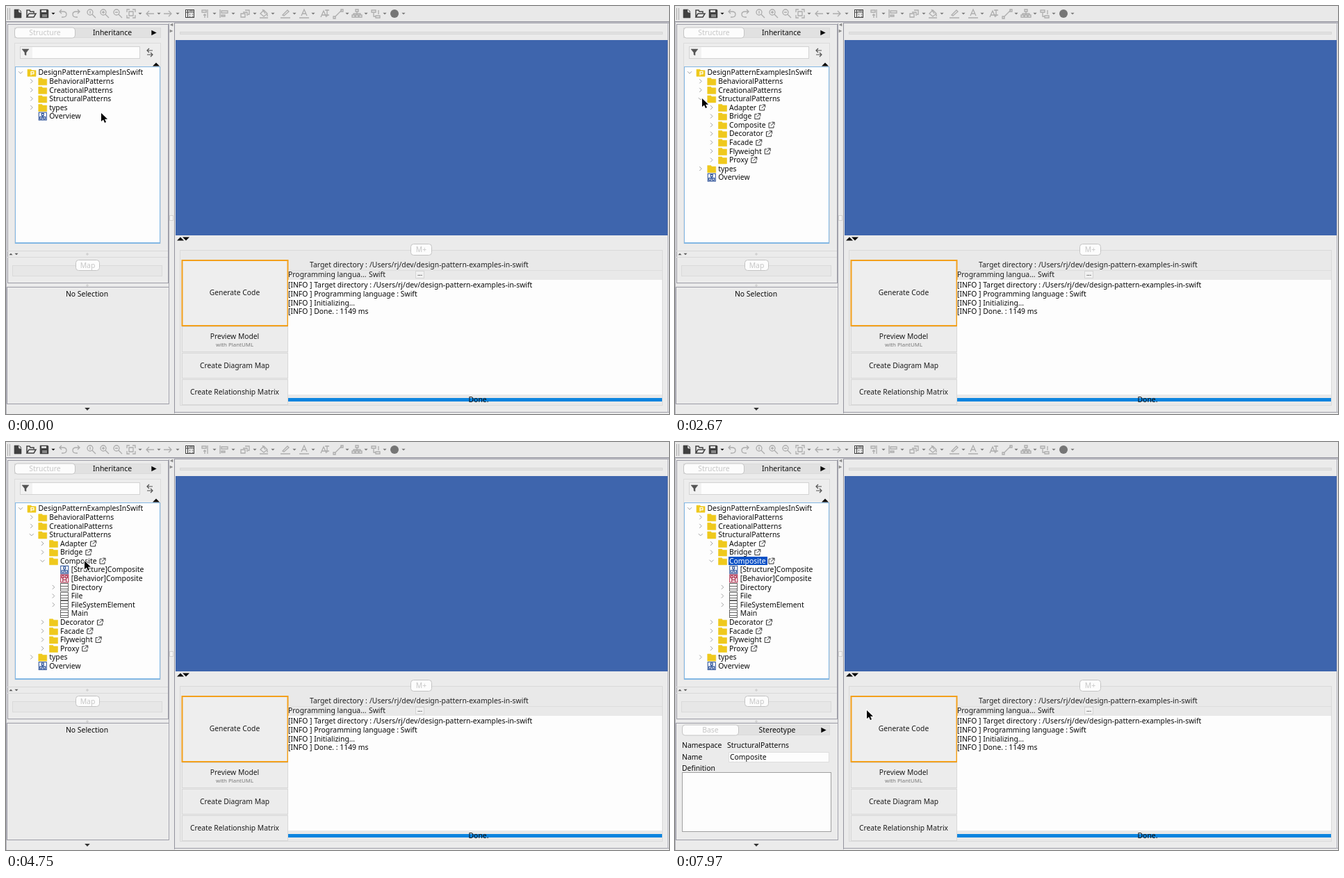
Write an HTML page with a canvas that moves like this. It is 954 px wide and 587 px high and loops after 7990 ms.

```html
<!DOCTYPE html>
<html lang="en">
<head>
<meta charset="utf-8">
<style>
html, body { margin: 0; width: 954px; height: 587px; overflow: hidden; background: #ebebeb; }
canvas { display: block; }
</style>
</head>
<body>
<canvas id="stage" width="954" height="587"></canvas>
<script>
const LOOP = 7990, OPEN_STRUCTURAL = 2200, OPEN_COMPOSITE = 3900, SELECT = 5150;
const ctx = document.getElementById('stage').getContext('2d');
const GREY = '#ebebeb', DIM = '#adadad', DARK = '#404040', INK = '#0a0a0a', PAPER = '#fdfdfd';

// time, x, y of the pointer tip; eased between points
const path = [
  [0, 137, 154], [1000, 137, 154], [1360, 71, 138], [1700, 39, 133], [2700, 39, 133],
  [3530, 54, 169], [4150, 54, 169], [4700, 113, 171], [6230, 113, 171],
  [6930, 183, 283], [7970, 276, 386], [7990, 276, 386]
];

function rect(x, y, w, h, fill, stroke) {
  if (fill) { ctx.fillStyle = fill; ctx.fillRect(x, y, w, h); }
  if (stroke) { ctx.strokeStyle = stroke; ctx.lineWidth = 1; ctx.strokeRect(x + .5, y + .5, w - 1, h - 1); }
}

function text(s, x, y, { size = 10.4, color = INK, align = 'left', weight = 500 } = {}) {
  ctx.font = `${weight} ${size}px "Noto Sans", "Open Sans", sans-serif`;
  ctx.textAlign = align;
  ctx.fillStyle = color;
  ctx.fillText(s, x, y + 3.7);
}

function icon(d, x, y, color = DIM, width = 1.3, fill = false) {
  ctx.save();
  ctx.translate(x, y);
  const p = new Path2D(d);
  ctx.strokeStyle = ctx.fillStyle = color;
  ctx.lineWidth = width;
  if (fill) ctx.fill(p);
  if (width) ctx.stroke(p);
  ctx.restore();
}

function triangle(x, y, r, dir, color = INK) {
  const shapes = {
    up: `M${-r} ${r / 2}H${r}L0 ${-r / 2}Z`,
    down: `M${-r} ${-r / 2}H${r}L0 ${r / 2}Z`,
    right: `M${-r} ${-r}L${r} 0L${-r} ${r}Z`,
    left: `M${r} ${-r}L${-r} 0L${r} ${r}Z`
  };
  icon(shapes[dir], x, y, color, 0, true);
}

function pill(label, x, y, w, h) {
  ctx.beginPath();
  ctx.roundRect(x + .5, y + .5, w - 1, h - 1, 4);
  ctx.fillStyle = '#fcfcfc';
  ctx.fill();
  ctx.strokeStyle = '#c4c4c4';
  ctx.lineWidth = 1;
  ctx.stroke();
  text(label, x + w / 2, y + h / 2, { align: 'center', color: '#c6c6c6' });
}

function tabs(active, other, y, w) {
  rect(12, y, 211, 15, '#e1e1e1', '#dadada');
  text(other, 12 + w + 53, y + 7.5, { align: 'center' });
  triangle(y < 100 ? 213 : 214, y + 7.5, 3.7, 'right');
  pill(active, y < 100 ? 12 : 10, y - .5, w, 16);
}

const toolbar = [
  ['M-5 -3H0Q5 -3 5 1Q5 5 0 5H-2M-2 -6L-5 -3L-2 0', 82],
  ['M5 -3H0Q-5 -3 -5 1Q-5 5 0 5H2M2 -6L5 -3L2 0', 101],
  ['M-6 -2A4 4 0 1 1 2 -2A4 4 0 1 1 -6 -2M1 1L6 6M-2 -4V0', 123],
  ['M-6 -2A4 4 0 1 1 2 -2A4 4 0 1 1 -6 -2M1 1L6 6M-4 -2H0M-2 -4V0', 142],
  ['M-6 -2A4 4 0 1 1 2 -2A4 4 0 1 1 -6 -2M1 1L6 6M-4 -2H0', 161],
  ['M-6 -2V-6H-2M2 -6H6V-2M6 2V6H2M-2 6H-6V2M-3 -3H3V3H-3Z', 180, 193],
  ['M6 0H-5M-1 -4L-5 0L-1 4', 207, 220],
  ['M-6 0H5M1 -4L5 0L1 4', 233, 247],
  ['M-5 -5H1V-2H-5ZM3 -6V6M-1 0V6M-3 2H1', 287, 300],
  ['M-6 -6V6M-4 -4H5V-1H-4ZM-4 2H1V4H-4Z', 314, 327],
  ['M-6 0H0V5H-6ZM-3 -2H3V3M0 -5H6V1H4', 344, 358],
  ['M-5 0L0 -5L5 0L0 4ZM-2 -6L2 0M-6 6H6M5 1V4', 371, 384],
  ['M-4 2L3 -5L5 -3L-2 3ZM-7 6H7', 402, 415],
  ['M-4 3L0 -6L4 3M-2 0H2M-7 6H7', 429, 442],
  ['M-6 5L-2 -4L2 5M-5 2H1M0 -5H6M3 -6V4M0 2H6', 459],
  ['M-5 5L5 -5M-7 4H-4V7H-7ZM4 -6H7V-3H4Z', 478, 491],
  ['M-2 -6H2V-3H-2ZM0 -3V2M-5 2V0H5V2M-7 2H-3V5H-7ZM-2 2H2V5H-2ZM3 2H7V5H3Z', 505, 518],
  ['M-6 -5H0V-2H-6ZM0 3H6V6H0ZM-3 -1V4H0M4 -5V1', 532, 545]
];

function drawToolbar() {
  rect(0, 0, 954, 22, '#e9e9e9');
  rect(0, 22, 954, 1, '#8e8e98');
  rect(0, 23, 954, 1, '#c9c9cf');
  rect(2, 3, 1, 17, '#aaa');
  rect(5, 3, 1, 17, '#aaa');
  icon('M-5 -6H2L5 -3V6H-5ZM1 -6V-2H5', 17, 11, DARK, .6, true);
  icon('M2 -6V-2H6', 17, 11, GREY, .8);
  icon('M-6 5V-5H-2L-1 -3H4V-1M-6 5L-3 0H7L4 5Z', 36, 11, DARK, 1.5);
  icon('M-6 -6H5L6 -5V6H-6Z', 55, 11, DARK, .5, true);
  rect(51, 6, 7, 3, '#ddd');
  rect(52, 12, 7, 4, '#888');
  triangle(68, 11, 2.6, 'down');
  for (const [d, x, arrow] of toolbar) {
    icon(d, x, 11);
    if (arrow) triangle(arrow, 11, 2.6, 'down', '#777');
  }
  rect(258, 5, 13, 12, '#f5f5f5', DARK);
  icon('M-3 -6V6M-6 -2H6M-1 1H1M3 1H5M-1 4H1M3 4H5M-1 -4H5', 264.5, 11, DARK, 1.2);
  icon('M-6 0A6 6 0 1 1 6 0A6 6 0 1 1 -6 0', 559, 11, '#757575', 0, true);
  triangle(572, 11, 2.6, 'down', '#777');
}

function diagramIcon(x, y, color, behavior) {
  rect(x - 6, y - 6, 12, 12, '#fff', color);
  icon(behavior ? 'M-4 -4H-1V-1H-4ZM1 -4H4V-1H1ZM-2.5 -1V5M2.5 -1V5M-2.5 2H2.5'
    : 'M-1.5 -4H1.5V-1H-1.5ZM0 -1V1M-3 1H3M-4 1H-1V4H-4ZM1 1H4V4H1Z', x, y, color, 1.1);
}

function treeRows(t) {
  const rows = [[0, 'DesignPatternExamplesInSwift', 'root', true],
    [1, 'BehavioralPatterns'], [1, 'CreationalPatterns'],
    [1, 'StructuralPatterns', 'folder', t >= OPEN_STRUCTURAL]];
  if (t >= OPEN_STRUCTURAL) {
    for (const name of ['Adapter', 'Bridge', 'Composite', 'Decorator', 'Facade', 'Flyweight', 'Proxy']) {
      const open = name === 'Composite' && t >= OPEN_COMPOSITE;
      rows.push([2, name, 'link', open]);
      if (open) rows.push([3, '[Structure]Composite', 'diagram'], [3, '[Behavior]Composite', 'behavior'],
        [3, 'Directory', 'class'], [3, 'File', 'class'], [3, 'FileSystemElement', 'class'], [3, 'Main', 'leaf']);
    }
  }
  rows.push([1, 'types'], [1, 'Overview', 'diagram']);
  return rows;
}

function drawTree(t) {
  rect(13, 87, 209, 255, PAPER, '#82b7e4');
  rect(14, 340, 207, 1, '#82b7e4');
  treeRows(t).forEach(([depth, name, kind = 'folder', open], i) => {
    const x = 37 + depth * 15.75, y = 95.7 + i * 12.58;
    if (!['diagram', 'behavior', 'leaf'].includes(kind))
      icon(open ? 'M-3 -1.5L0 1.5L3 -1.5' : 'M-1.5 -3L1.5 0L-1.5 3', x - 16, y, '#a2a2a2', 1);
    if (kind === 'diagram') diagramIcon(x, y, '#234a94');
    else if (kind === 'behavior') diagramIcon(x, y, '#a51c3d', true);
    else if (kind === 'class' || kind === 'leaf') {
      const top = Math.round(y) - 6;
      rect(Math.round(x) - 6, top, 12, 12, '#fff', '#666');
      rect(Math.round(x) - 6, top + 4, 12, 1, '#666');
      rect(Math.round(x) - 6, top + 8, 12, 1, '#666');
    } else {
      icon('M-6 -4.5H-1L0 -3H6V5.5H-6Z', x, y, '#efc91d', .6, true);
      if (kind === 'root') icon('M-1 4V-1H3V2H-1', x, y, '#fff', 1.2);
    }
    const picked = name === 'Composite' && t >= SELECT;
    if (picked) rect(77, Math.round(y) - 6, 56, 12, '#0c51c5');
    text(name, x + 9.5, y, { color: picked ? '#fff' : INK });
    if (kind === 'link')
      icon('M-1 -3H-4V4H3V1M0 -4H4V0M4 -4L-1 1', x + 18 + ctx.measureText(name).width, y, '#333', 1);
  });
}

function drawLeft(t) {
  rect(2, 26, 232, 373, null, '#9c9ca6');
  rect(0, 24, 1, 563, '#b4b4bd');
  tabs('Structure', 'Inheritance', 31, 88);
  rect(12, 53, 211, 289, '#ededed', '#dcdcdc');
  rect(20, 58, 173, 18, '#f2f2f2', '#d3d3d3');
  rect(38, 59, 154, 16, PAPER);
  icon('M-5 -4H5L1 1V5L-1 4V1Z', 28, 66, '#555', .5, true);
  icon('M4 -3H-4M-1 -6L-4 -3L-1 0M-4 3H4M1 0L4 3L1 6', 207, 67, '#555', 1.2);
  triangle(216, 84, 5, 'up');
  drawTree(t);

  rect(2, 352, 231, 1, '#d8d8d8');
  rect(2, 361, 231, 1, '#dadada');
  triangle(7, 357, 2.5, 'up', '#555');
  triangle(15, 357, 2.5, 'down', '#555');
  icon('M-2 0H2M0 -2V2', 117, 357, '#c9c9c9', 1);
  rect(9, 373, 216, 16, '#e7e7e7', '#dadada');
  pill('Map', 100, 365, 35, 16);
  icon('M-2 0H2M0 -2V2', 117, 402, '#c9c9c9', 1);

  rect(1, 404, 234, 169, null, '#9c9ca6');
  if (t < SELECT) text('No Selection', 116.5, 414, { align: 'center' });
  else {
    tabs('Base', 'Stereotype', 407, 82);
    text('Namespace', 10, 436);
    text('StructuralPatterns', 75, 436);
    text('Name', 10, 453);
    rect(77, 446, 145, 15, PAPER, '#dedede');
    text('Composite', 79, 453);
    text('Definition', 10, 469);
    rect(10, 475, 215, 86, PAPER, '#a0a0a0');
  }
  triangle(117, 580, 3.8, 'down', '#333');
}

function drawRight() {
  rect(234, 25, 1, 548, '#a5a5ae');
  rect(242, 24, 1, 562, '#92929c');
  rect(243, 24, 711, 1, '#9c9ca6');
  rect(242, 584, 712, 1, '#9c9ca6');
  rect(952, 24, 1, 561, '#b5b5bd');
  triangle(238, 27, 2.3, 'left', '#888');
  triangle(238, 36, 2.3, 'right', '#888');
  rect(235, 301, 6, 8, '#f4f4f4', '#d3d3d3');
  rect(250, 37, 695, 4, '#e2e2e2', '#d6d6d6');
  rect(244, 49, 708, 281, '#3e65ad');
  triangle(251, 335, 5, 'up');
  triangle(259, 335, 5, 'down');

  rect(250, 351, 695, 224, '#e9e9e9', '#dadada');
  pill('M+', 582, 342, 31, 17);
  rect(253, 365, 153, 95, '#eeeeee');
  ctx.strokeStyle = '#f3a01c';
  ctx.lineWidth = 2;
  ctx.strokeRect(253.5, 366, 152, 94);
  const button = { align: 'center', color: '#1c1c1c', size: 10.3 };
  text('Generate Code', 329, 412.5, button);
  for (const y of [461, 499, 537]) rect(253, y, 153, 37, '#ececec', '#d8d8d8');
  text('Preview Model', 329, 475, button);
  text('with PlantUML', 329, 486, { align: 'center', size: 7.9, color: '#777', weight: 400 });
  text('Create Diagram Map', 329, 517, button);
  text('Create Relationship Matrix', 329, 555, button);

  const label = { color: '#202020' }, dir = '/Users/rj/dev/design-pattern-examples-in-swift';
  text('Target directory :', 437, 372.5, label);
  text(dir, 523, 372.5, label);
  rect(406, 380, 538, 1, '#dedede');
  text('Programming langua...', 406, 386.5, label);
  text('Swift', 522, 386.5, label);
  rect(589, 381, 13, 11, '#f1f1f1', '#d5d5d5');
  text('...', 595.5, 384, { align: 'center', size: 9 });
  rect(406, 394, 538, 165, PAPER);
  ['Target directory : ' + dir, 'Programming language : Swift', 'Initializing...', 'Done. : 1149 ms']
    .forEach((line, i) => text('[INFO ] ' + line, 406, 401.7 + i * 12.6));
  rect(406, 564, 538, 5, '#0b84df');
  text('Done.', 680, 566, { align: 'center' });
}

function drawPointer(t) {
  const i = Math.max(1, path.findIndex(p => p[0] > t));
  const [t0, x0, y0] = path[i - 1], [t1, x1, y1] = path[i];
  const u = (t - t0) / (t1 - t0), k = u * u * (3 - 2 * u);
  const x = x0 + (x1 - x0) * k, y = y0 + (y1 - y0) * k;
  const arrow = 'M0 0V12L3 9.5L5 14L7 13L5 8.8H9Z';
  icon(arrow, x, y, '#fff', 1.8);
  icon(arrow, x, y, '#000', 0, true);
}

function frame(now) {
  const t = now % LOOP;
  rect(0, 0, 954, 587, GREY);
  drawToolbar();
  drawLeft(t);
  drawRight();
  drawPointer(t);
  requestAnimationFrame(frame);
}
requestAnimationFrame(frame);
</script>
</body>
</html>
```
